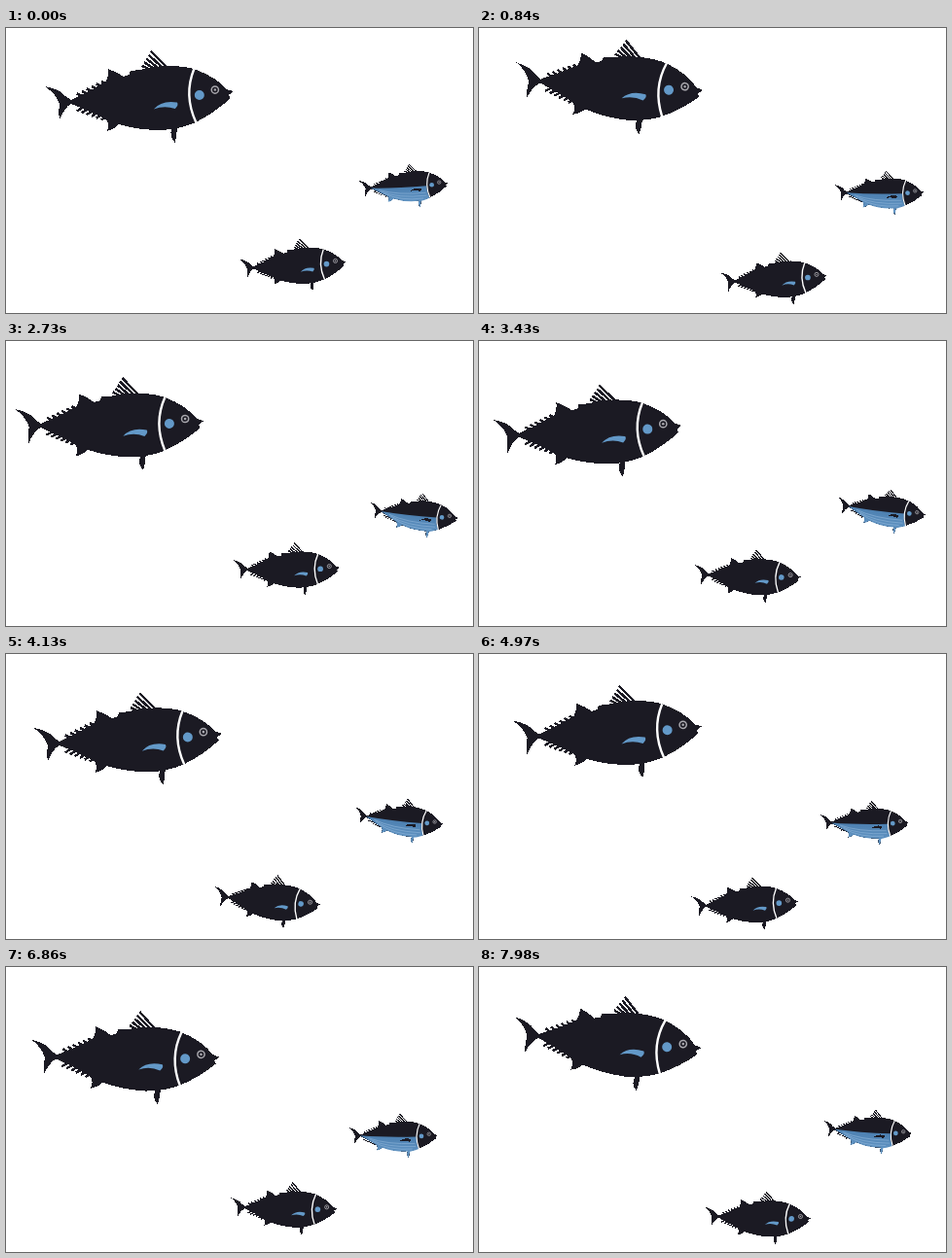
An HTML page for the animation above (8 s loop, 480 px wide and 293 px high).

```html
<!DOCTYPE html>
<html lang="en">
<head>
<meta charset="utf-8">
<title>Three fish</title>
<style>
  html, body { margin: 0; width: 100%; height: 100%; overflow: hidden; background: #fff; }
  svg { display: block; width: 100%; height: 100%; }
  .skin { fill: #1b1a23; shape-rendering: crispEdges; }
  .ray { fill: none; stroke: #1b1a23; stroke-width: 2.4; shape-rendering: crispEdges; }
  .blue { fill: #6399c8; }
  .gill { fill: none; stroke: #fff; stroke-width: 2.4; }
  .stripe { fill: none; stroke: #8db3d8; stroke-width: 1.3; }
  .eye { fill: none; stroke: #a9a8ae; stroke-width: 1.5; }
  .pupil { fill: #a9a8ae; }
</style>
</head>
<body>
<svg viewBox="0 0 480 293" xmlns="http://www.w3.org/2000/svg">
  <defs>
    <linearGradient id="belly" x1="0" y1="0" x2="0" y2="1">
      <stop offset="0" stop-color="#4a7dae"/>
      <stop offset="1" stop-color="#699cca"/>
    </linearGradient>

    <g id="trunk">
      <path class="skin" d="M40 60 Q56 63 61 70 L67 74 Q85 66 103 55 Q106 48 105 42 Q114 45 121 50 L127 48 L128 44
        L138 43 Q152 39 168 39 Q182 39 193 42 Q216 50 227 63 L234 65 L229 69 L231 72 Q215 87 195 97
        Q179 104 160 105 Q136 105 116 99 Q112 104 104 106 Q107 99 103 94 Q86 85 67 78
        Q60 82 55 95 Q54 86 55 78 Q52 68 40 60Z"/>
      <path class="skin" d="M171 103 Q167 111 174 118 Q176 111 176 102Z"/>
      <path class="ray" id="rays"/>
    </g>

    <g id="head">
      <path class="gill" d="M193.500 42 Q182.500 69 195.500 97"/>
      <circle class="blue" cx="199" cy="69" r="5"/>
      <circle class="eye" cx="215" cy="63.500" r="3.600"/>
      <circle class="pupil" cx="215" cy="63.500" r="1.300"/>
    </g>

    <path id="pectoral" d="M152 83.500 Q160 74 176 76.500 Q178 79 174 83 Q163 79 152 83.500Z"/>

    <g id="dark">
      <use href="#trunk"/>
      <use href="#pectoral" class="blue"/>
      <use href="#head"/>
    </g>

    <g id="striped">
      <use href="#trunk"/>
      <path fill="url(#belly)" d="M66 76 Q120 77 188 71 Q188 85 195 97 Q179 104 176 104 L174 118 Q168 111 171 104
        Q140 107 116 99 Q112 104 104 106 Q107 99 103 94 Q86 86 66 76Z"/>
      <path class="stripe" d="M84 80 Q125 92 186 86 M88 83 Q125 99 188 92 M94 87 Q130 105 181 98"/>
      <use href="#pectoral" class="skin"/>
      <use href="#head"/>
    </g>
  </defs>

  <g id="big"><use href="#dark" x="-149" y="-24"/></g>
  <g id="small"><use href="#striped" x="-149" y="-24"/></g>
  <g id="medium"><use href="#dark" x="-149" y="-24"/></g>
</svg>

<script>
const LOOP = 8, STEP = 0.07;

// A value that swings with a cosine ease from one stop to the next, a stop every `gap` seconds.
const drift = (start, gap, ...stops) => time => {
  const pos = Math.max(0, Math.min(stops.length - 1, (time - start) / gap));
  const i = Math.min(stops.length - 2, Math.floor(pos));
  const ease = (1 - Math.cos(Math.PI * (pos - i))) / 2;
  return stops[i] + (stops[i + 1] - stops[i]) * ease;
};

// x and y place the tip of the dorsal fin; tilt turns the fish around it.
const school = [
  { id: 'big', scale: 1,
    x: drift(-0.9, 1.9, 147, 151, 119, 144, 137, 154),
    y: drift(-0.5, 1.9, 26.8, 9.5, 45.5, 32.5, 46.5, 11),
    tilt: drift(-0.5, 1.9, -1.75, 9.2, 0.3, 0.3, 4, 13) },
  { id: 'small', scale: 0.473,
    x: drift(-0.2, 2.8, 413.8, 428, 401.5, 407.5),
    y: drift(-0.9, 1.7, 131.5, 147, 157, 149, 154.5, 149, 132),
    tilt: drift(0, 1.9, 0, 7.9, 10, 0.5, 5, 25) },
  { id: 'medium', scale: 0.567,
    x: drift(-1.7, 3, 286, 311, 278.5, 295, 295),
    y: drift(-1.1, 1.9, 194, 231, 207.5, 231, 220.5, 232.5),
    tilt: drift(1.7, 1.2, 0, 2.7, 8.3, -0.5, 4.5, 4.7) }
];

// Dorsal spines and the finlets along the tail.
function rays() {
  let d = '';
  const line = (x, y, dx, dy) => { d += `M${x} ${y}l${dx} ${dy}`; };
  for (let i = 0; i < 5; i++) line(149 - 2.3 * i, 24 + 3.7 * i, 17.5 - 2.3 * i, 17 - 3.3 * i);
  for (let i = 0; i < 6; i++) {
    const x = 73 + 5 * i;
    line(x, 67.5 - 2.5 * i, 8, 4);
    line(x, 85.5 + 1.8 * i, 8, -5);
  }
  return d;
}

document.getElementById('rays').setAttribute('d', rays());
for (const fish of school) fish.node = document.getElementById(fish.id);

const begin = performance.now();
function draw() {
  const elapsed = (performance.now() - begin) / 1000 % LOOP;
  const t = Math.floor(elapsed / STEP + 1e-6) * STEP;
  for (const { node, scale, x, y, tilt } of school) {
    node.setAttribute('transform', `translate(${x(t)} ${y(t)}) rotate(${tilt(t)}) scale(${scale})`);
  }
  requestAnimationFrame(draw);
}
draw();
</script>
</body>
</html>
```
